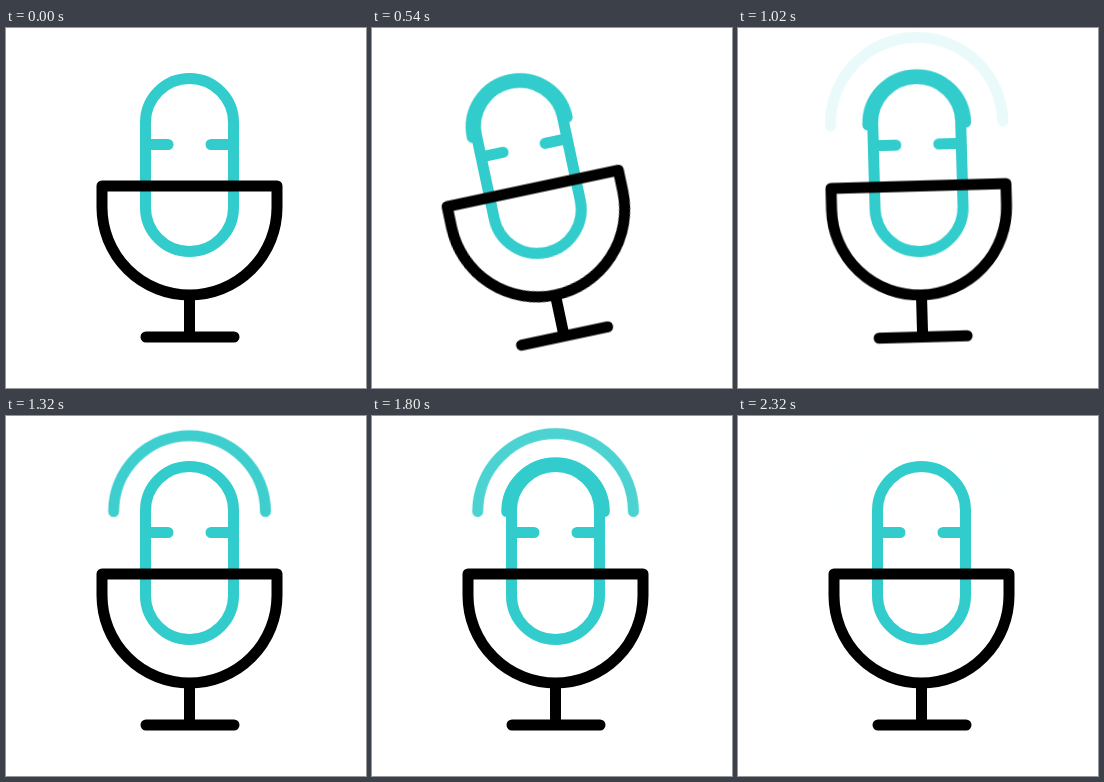
Write an HTML page without scripts that moves like this. It is 360 px wide and 360 px high and loops after 2.4 s.

```html
<!DOCTYPE html>
<html lang="en">
<head>
<meta charset="utf-8">
<title>Microphone</title>
<style>
  html, body { margin: 0; width: 100%; height: 100%; overflow: hidden; background: #fff; }
  svg { display: block; width: 100vw; height: 100vh; }

  path { fill: none; stroke-width: 11px; stroke-linecap: round; stroke-linejoin: round; }
  .teal { stroke: #33cccc; }
  .black { stroke: #000; }

  .mic {
    transform-origin: 183.5px 267.5px;
    animation: sway 2400ms cubic-bezier(.37, 0, .63, 1) infinite;
  }

  .wave {
    vector-effect: non-scaling-stroke;
    opacity: 0;
    animation: grow 2400ms cubic-bezier(.37, 0, .63, 1) var(--start) infinite,
               fade 2400ms cubic-bezier(.37, 0, .63, 1) var(--start) infinite;
  }

  @keyframes sway {
    0% { transform: rotate(0deg); }
    22.5% { transform: rotate(-12deg); }
    35% { transform: rotate(6deg); }
    45.2% { transform: rotate(-3deg); }
    55%, 100% { transform: rotate(0deg); }
  }

  /* Waves scale a unit arc, so the scale is the radius */
  @keyframes grow {
    0% { transform: scale(44); }
    28.5%, 100% { transform: scale(87); }
  }

  @keyframes fade {
    0%, 17.1% { opacity: 1; }
    28.5%, 100% { opacity: 0; }
  }
</style>
</head>
<body>
<svg viewBox="0 0 360 360">
  <defs>
    <path id="arc" d="M-1 0A1 1 0 0 1 1 0"/>
  </defs>
  <g class="mic">
    <g class="teal" transform="translate(183.5 95.5)">
      <path class="wave" style="--start: 396ms" d="M-1 0A1 1 0 0 1 1 0"/>
      <path class="wave" style="--start: 870ms" d="M-1 0A1 1 0 0 1 1 0"/>
      <path class="wave" style="--start: 1327ms" d="M-1 0A1 1 0 0 1 1 0"/>
      <path class="wave" style="--start: 1652ms" d="M-1 0A1 1 0 0 1 1 0"/>
    </g>
    <path class="teal" d="M139.5 94.5a44 44 0 0 1 88 0v85a44 44 0 0 1-88 0zM139.5 116.5H162M227.5 116.5H205"/>
    <path class="black" d="M96 158H271V179.5a87.5 87.5 0 0 1-175 0zM183.5 267V309M140 309H228"/>
  </g>
</svg>
</body>
</html>
```
